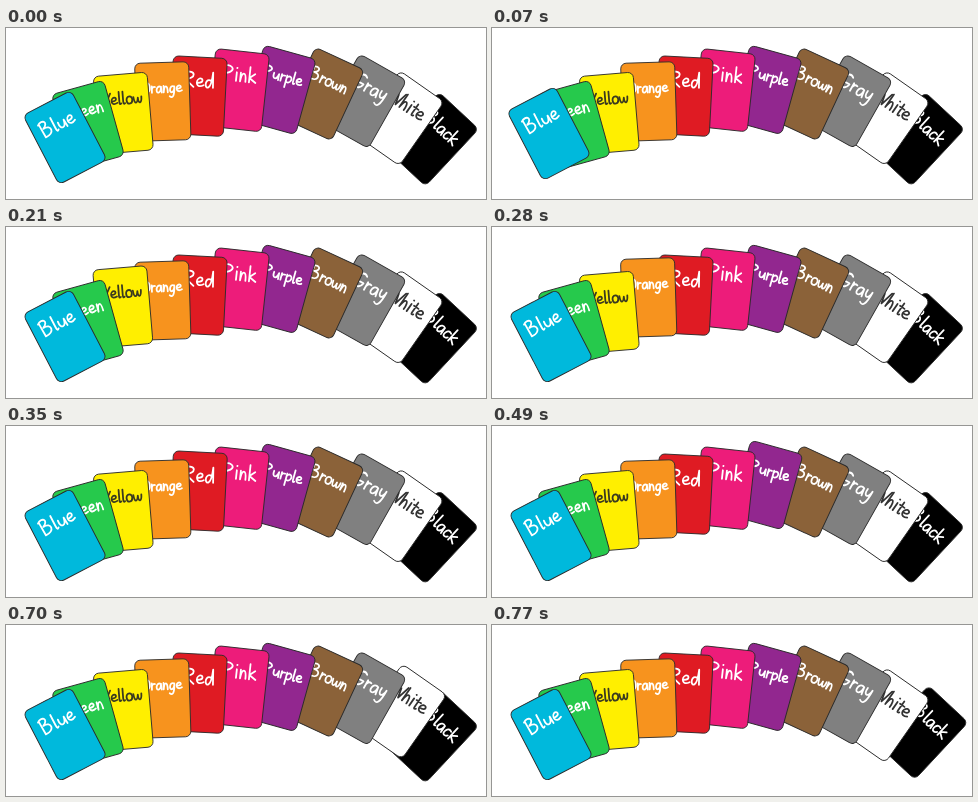
Write an HTML page that moves like this. It is 480 px wide and 171 px high and loops after 840 ms.

```html
<!DOCTYPE html>
<html lang="en">
<head>
<meta charset="utf-8">
<title>Colour cards</title>
<style>
html, body { margin: 0; width: 100%; height: 100%; overflow: hidden; background: #fff; }
svg { display: block; width: 100vw; height: 100vh; }
rect { stroke: #2b2b2b; stroke-width: .9; }
path { fill: none; stroke-width: 1.8; stroke-linecap: round; stroke-linejoin: round; vector-effect: non-scaling-stroke; }
</style>
</head>
<body>
<svg id="stage" viewBox="0 0 480 171"></svg>
<script>
const STEP = 70, STEPS = 12;
const CARD = { w: 54, h: 78, r: 5.5 };
const TEXT = { width: 41, maxScale: 1.08, gap: .3, baseline: -9 };

// Pen strokes on a baseline at 0: [advance, path]
const CAPS = {
  B: [12, 'M1-13L1.5 0M0-13C5-17 11-12 3-8C12-9 11 1 1.5 0'],
  G: [11, 'M9-12C5-16 0-10 1-5C2 2 8 1 9-5H5'],
  O: [11, 'M6-13C-2-13-1 0 5 0C12 0 11-13 5-13'],
  P: [11, 'M2-14V0M0-12C4-17 16-10 2-6'],
  R: [12, 'M2-14V0M0-13C13-17 12-7 2-7L10 0'],
  W: [11, 'M0-13L3 0L5.5-9L8 0L11-13'],
  Y: [10, 'M0-13L5-7M10-13L3 0']
};
const SMALL = {
  a: [8, 'M6-7C0-10-1 1 3 0Q6-1 6-7L7 0'],
  c: [7, 'M6-7C1-10-1 0 3 0Q5 0 6-2'],
  d: [9, 'M6-6C0-10-1 1 3 0Q6-1 7-14L7.5 0'],
  e: [8, 'M1-4C8-4 6-9 3-8C-1-6 0 2 7-2'],
  g: [8, 'M6-7C0-10-1 1 3 0Q6-1 6-7C6 4 4 8 0 5'],
  h: [7.5, 'M1-14V0C2-10 6-10 6 0'],
  i: [4, 'M1.5-8V0M1.5-12h.2'],
  k: [8, 'M1-14V0M6-8L1-4L7 0'],
  l: [4, 'M1-14V-3Q1 1 3-1'],
  n: [8, 'M1-8V0C2-10 6-10 6 0'],
  o: [8, 'M4-8C-1-8 0 0 3.5 0C8 0 8-8 4-8'],
  p: [8, 'M1-8V6M1-5C3-10 9-7 6-2Q4 1 1-1'],
  r: [6, 'M1-8V0M1-4Q2-8 5-7'],
  t: [5, 'M2-12V-2Q2 1 4-1M0-8H5'],
  u: [9, 'M1-7C0 1 6 1 7-7L7.5 0'],
  w: [10, 'M0-7C1 2 4 1 5-6C5 2 9 1 9-7'],
  y: [8, 'M1-8C0 0 5 0 6-8C6 4 4 8 0 5']
};
const GLYPHS = { ...CAPS, ...SMALL };

// word, fill, ink, centre x, centre y, angle, lift
const CARDS = [
  ['Blue', '#00b9dc', '#fff', 59, 109.5, -27.5, 4.5],
  ['Green', '#26c94c', '#fff', 82, 97, -15.5, 7],
  ['Yellow', '#ffef00', '#3a3a20', 117.3, 85.2, -4.8, 5.5],
  ['Orange', '#f7931e', '#fff', 156.8, 73.5, -1.8, 3],
  ['Red', '#df1b23', '#fff', 192.3, 68.1, 3, 3],
  ['Pink', '#ed1c7a', '#fff', 232.5, 62.2, 6.2, 3],
  ['Purple', '#92278f', '#fff', 273.8, 61.9, 15.5, 3],
  ['Brown', '#8b6239', '#fff', 317.5, 66, 25, 4],
  ['Gray', '#808080', '#fff', 358, 73.2, 29.5, 4],
  ['White', '#fff', '#333', 393.6, 90.2, 35, 4.5],
  ['Black', '#000', '#fff', 426.3, 111.2, 43, 5]
];

const stage = document.getElementById('stage');

function add(parent, tag, attrs) {
  const el = document.createElementNS('http://www.w3.org/2000/svg', tag);
  for (const key in attrs) el.setAttribute(key, attrs[key]);
  return parent.appendChild(el);
}

function write(parent, word, ink) {
  const letters = [...word].map(ch => GLYPHS[ch]);
  const width = letters.reduce((sum, [adv]) => sum + adv + TEXT.gap, 0);
  const scale = Math.min(TEXT.maxScale, TEXT.width / width);
  const line = add(parent, 'g', {
    role: 'img', 'aria-label': word, stroke: ink,
    transform: `translate(${-width * scale / 2} ${TEXT.baseline}) scale(${scale})`
  });
  let x = 0;
  for (const [adv, d] of letters) {
    add(line, 'path', { d, transform: `translate(${x} 0)` });
    x += adv + TEXT.gap;
  }
}

function makeCard([word, fill, ink, x, y, angle, lift]) {
  const g = add(stage, 'g', {});
  add(g, 'rect', { x: -CARD.w / 2, y: -CARD.h / 2, width: CARD.w, height: CARD.h, rx: CARD.r, fill });
  write(g, word, ink);
  return up => g.setAttribute('transform',
    `translate(${x} ${y}) rotate(${angle}) translate(0 ${up ? -lift : 0})`);
}

// The leftmost card lies on top, so build from the right.
const movers = CARDS.slice().reverse().map(makeCard).reverse();

function draw(ms) {
  const step = Math.floor(ms / STEP) % STEPS;
  movers.forEach((move, i) => move(i === step - 1));
}

const start = performance.now();
function tick() {
  draw(performance.now() - start);
  requestAnimationFrame(tick);
}
tick();
</script>
</body>
</html>
```
